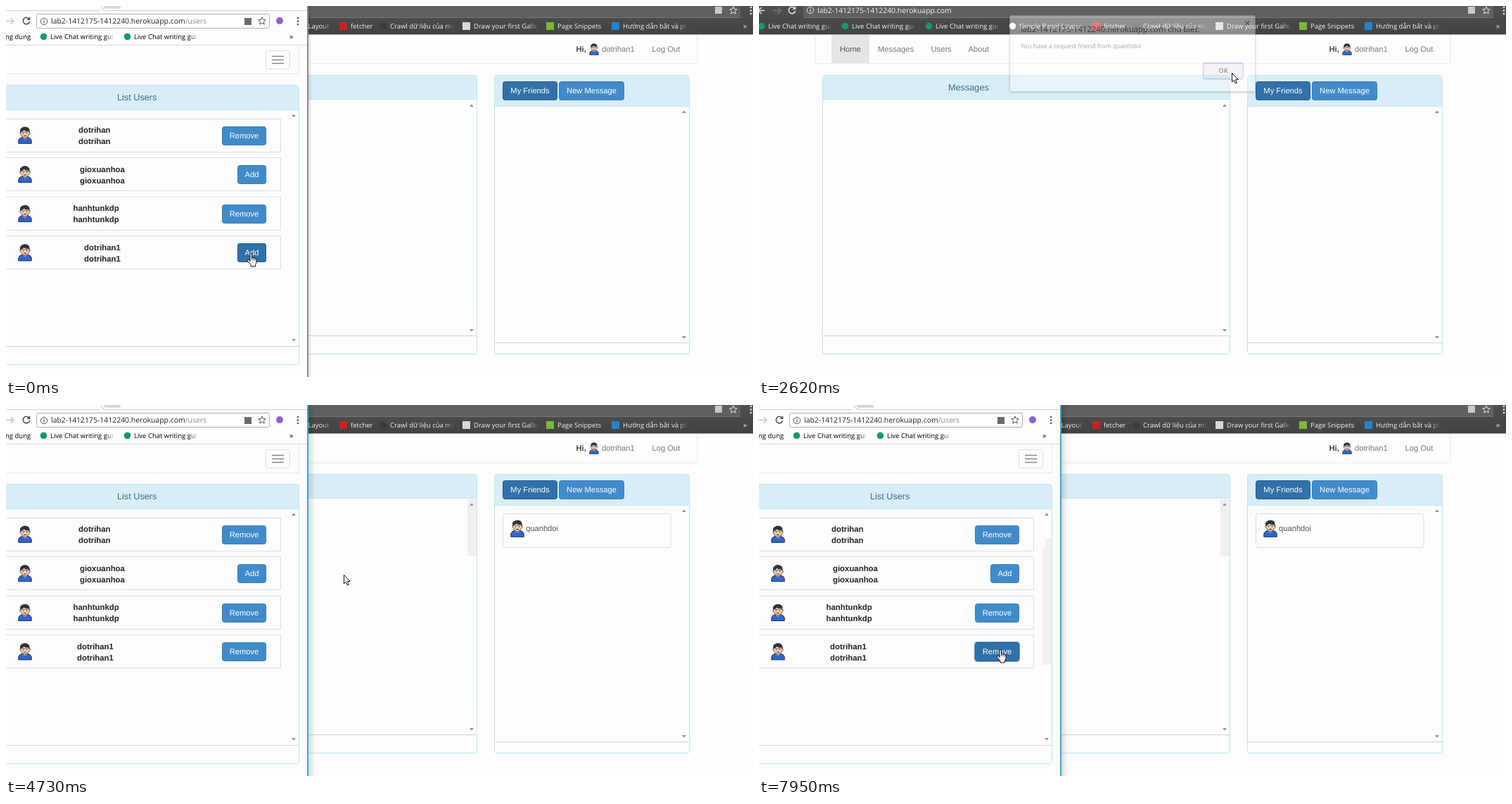
These frames come from a looping animation (1062x527 px, 8000 ms). An HTML page:

```html
<!DOCTYPE html>
<html lang="vi">
<head>
<meta charset="utf-8">
<title>Friend request</title>
<style>
html, body { margin: 0; width: 100%; height: 100%; overflow: hidden; background: #fdfdfd; }
svg { display: block; width: 1062px; height: 527px; }
text { font: 11.2px "Liberation Sans", Arial, sans-serif; text-rendering: geometricPrecision; white-space: pre; }
.ui { font: 9.5px "Open Sans", "Noto Sans", sans-serif; }
.url { font: 10.45px "Open Sans", "Noto Sans", sans-serif; }
.ask { font: 11.3px "Open Sans", "Noto Sans", sans-serif; fill: #222; }
.note { font: 8.95px "Open Sans", "Noto Sans", sans-serif; fill: #222; }
.ok { font: bold 9.2px "Open Sans", "Noto Sans", sans-serif; fill: #222; }
.title { font-size: 12.7px; fill: #3a6c86; }
.user { font-size: 11.4px; font-weight: bold; fill: #222; }
.hi { font-weight: bold; fill: #444; }
.nav { fill: #777; }
.light { fill: #f4f4f4; }
.line { fill: none; stroke: #ddd; }
.panel { fill: #fdfdfd; stroke: #bce8f1; }
.head { fill: #d9edf7; }
.tri { fill: #8f8f8f; }
.track { fill: #f0f0f0; }
.btn rect { fill: #428bca; stroke: #357ebd; }
.btn text { fill: #fff; text-anchor: middle; }
.btn.dark rect { fill: #3071a9; stroke: #285e8e; }
.ring { fill: none; stroke: #69a7df; }

.anim, .anim * { animation: 8s step-end infinite; }
#win { animation-name: win; }
#active { animation-name: active; }
#idle { animation-name: idle; }
#addRing { animation-name: addRing; }
#addRow { animation-name: addRow; }
#removeRow { animation-name: removeRow; }
#hover { animation-name: hover; }
#hoverRing { animation-name: hoverRing; }
#trackB { animation-name: trackB; }
#track1 { animation-name: track1; }
#track2 { animation-name: track2; }
#track3 { animation-name: track3; }
#friend { animation-name: friend; }
#alert { animation-name: alert; }
#press { animation-name: press; }
#cursor { animation-name: move; }
#arrow { animation-name: arrow; }
#hand { animation-name: hand; }

@keyframes win { 0%, 51% { opacity: 1 } 10.5% { opacity: 0 } 100% { opacity: 1 } }
@keyframes active { 0% { opacity: 0 } 5%, 100% { opacity: 1 } }
@keyframes idle { 0% { opacity: 1 } 5%, 100% { opacity: 0 } }
@keyframes addRing { 0% { opacity: 0 } 5% { opacity: 1 } 10.5%, 100% { opacity: 0 } }
@keyframes addRow { 0% { opacity: 1 } 10.5%, 100% { opacity: 0 } }
@keyframes removeRow { 0% { opacity: 0 } 10.5%, 100% { opacity: 1 } }
@keyframes hover { 0%, 85.625% { opacity: 0 } 65.875%, 94.375%, 100% { opacity: 1 } }
@keyframes hoverRing { 0% { opacity: 0 } 96.125%, 100% { opacity: 1 } }
@keyframes trackB { 0% { opacity: 0 } 37.625%, 100% { opacity: 1 } }
@keyframes track1 { 0% { opacity: 0 } 61%, 100% { opacity: 1 } }
@keyframes track2 { 0% { opacity: 0 } 85.625%, 100% { opacity: 1 } }
@keyframes track3 { 0% { opacity: 0 } 89.25%, 100% { opacity: 1 } }
@keyframes friend { 0% { opacity: 0 } 34.25%, 100% { opacity: 1 } }
@keyframes press { 0% { opacity: 0 } 31%, 100% { opacity: 1 } }
@keyframes alert {
  0% { opacity: 0; transform: translateY(-7px) }
  12.125% { opacity: .66; transform: translateY(-7px) }
  14% { opacity: 1; transform: none }
  32.75% { opacity: .4; transform: translateY(-6px) }
  34.25%, 100% { opacity: 0; transform: none }
}
@keyframes arrow {
  0% { opacity: 0 } 10.5% { opacity: 1 } 42.5% { opacity: 0 } 55.875% { opacity: 1 }
  65.875% { opacity: 0 } 85.625% { opacity: 1 } 94.375%, 100% { opacity: 0 }
}
@keyframes hand {
  0% { opacity: 1 } 10.5% { opacity: 0 } 65.875% { opacity: 1 }
  85.625% { opacity: 0 } 94.375%, 100% { opacity: 1 }
}
@keyframes move {
  0% { transform: translate(343px, 351px) }
  10.5% { transform: translate(310px, 354px) }
  12.125% { transform: translate(268px, 351px) }
  14% { transform: translate(269px, 350px) }
  15.875% { transform: translate(312px, 335px) }
  17.375% { transform: translate(376px, 308px) }
  19.25% { transform: translate(586px, 158px) }
  21.125% { transform: translate(640px, 106px) }
  22.625% { transform: translate(677px, 76px) }
  24.5% { transform: translate(675px, 84px) }
  26% { transform: translate(672px, 95px) }
  37.625% { transform: translate(662px, 150px) }
  39.25% { transform: translate(610px, 320px) }
  40.875% { transform: translate(526px, 496px) }
  42.5% { transform: translate(500px, 540px) }
  55.875% { transform: translate(490px, 440px) }
  57.5% { transform: translate(470px, 340px) }
  59.125% { transform: translate(480px, 241px) }
  61% { transform: translate(410px, 285px) }
  62.625% { transform: translate(294px, 320px) }
  64.125% { transform: translate(325px, 314px) }
  65.875% { transform: translate(338px, 340px) }
  67.5% { transform: translate(337px, 353px) }
  70.875% { transform: translate(336px, 352px) }
  77.5% { transform: translate(337px, 351px) }
  79.125% { transform: translate(336px, 350px) }
  85.625% { transform: translate(408px, 338px) }
  87.375% { transform: translate(514px, 190px) }
  89.25% { transform: translate(500px, 230px) }
  90.875% { transform: translate(430px, 300px) }
  92.5% { transform: translate(372px, 342px) }
  94.375% { transform: translate(338px, 349px) }
  96.125%, 100% { transform: translate(338px, 347px) }
}
</style>
</head>
<body>
<svg id="stage" viewBox="0 0 1062 527">
  <defs>
    <linearGradient id="fadeDark"><stop offset="0" stop-color="#464646" stop-opacity="0"/><stop offset=".55" stop-color="#464646"/></linearGradient>
    <linearGradient id="fadeLight"><stop offset="0" stop-color="#fdfdfd" stop-opacity="0"/><stop offset=".55" stop-color="#fdfdfd"/></linearGradient>
    <linearGradient id="shade"><stop offset="0" stop-opacity=".14"/><stop offset="1" stop-opacity=".03"/></linearGradient>
    <linearGradient id="bar" x2="0" y2="1"><stop offset="0" stop-color="#505050"/><stop offset="1" stop-color="#424242"/></linearGradient>
    <filter id="drop" x="-5%" y="-10%" width="110%" height="125%"><feDropShadow dx="0" dy="1" stdDeviation="1.3" flood-opacity=".5"/></filter>
    <symbol id="avatar" viewBox="0 0 20 25">
      <path d="M.8 24.3V20q.4-3 4.700-4.500h9q4.300 1.500 4.700 4.500v4.300z" fill="#2f66cc" stroke="#1f2f5c"/>
      <path d="M7 13h6v3.500l-3 2-3-2z" fill="#e0aa82"/>
      <path d="M4 8q-1.500 0-1.200 2 .4 1.700 1.700 1.700Q6 16.400 10 16.400t5.500-4.700q1.300 0 1.700-1.700.3-2-1.200-2z" fill="#f3cba5" stroke="#4a3a36" stroke-width=".8"/>
      <path d="M3.600 9.500Q1.800 4 5 2.300 8-.2 12 .8q5.500 1 4.500 8.700l-1.700-2.700q-4 .8-6.300-1.300-1 1.800-3.500 2z" fill="#2f333c"/>
      <path d="M7.500 9.200v1.300M12.500 9.200v1.300M8 13.500h4" stroke="#3b3030" fill="none"/>
    </symbol>
    <symbol id="info" viewBox="0 0 12 12">
      <circle cx="6" cy="6" r="4.700" fill="none" stroke="currentColor"/><path d="M6 5.200v3.500M6 3.200v1.200" stroke="currentColor" stroke-width="1.200"/>
    </symbol>
    <symbol id="star" viewBox="0 0 12 12">
      <path d="M6 1l1.500 3.400 3.700.4-2.800 2.500.8 3.700L6 9.100 2.800 11l.8-3.700L.8 4.800l3.700-.4z" fill="none" stroke="currentColor"/>
    </symbol>
    <symbol id="reload" viewBox="0 0 12 12">
      <path d="M10 3.600A4.700 4.700 0 1 0 10.600 7" fill="none" stroke="currentColor" stroke-width="1.500"/><path d="M11.300 0v5H6.500z" fill="currentColor"/>
    </symbol>
    <symbol id="dots" viewBox="0 0 4 14">
      <g fill="currentColor"><circle cx="2" cy="2" r="1.300"/><circle cx="2" cy="6.500" r="1.300"/><circle cx="2" cy="11" r="1.300"/></g>
    </symbol>
  </defs>
</svg>
<script>
const text = (x, y, s, cls = "", more = "") => `<text x="${x}" y="${y}" class="${cls}" ${more}>${s}</text>`;
const rect = (x, y, w, h, attrs) => `<rect x="${x}" y="${y}" width="${w}" height="${h}" ${attrs}/>`;
const path = (d, attrs) => `<path d="${d}" ${attrs}/>`;
const dot = (x, y, r, fill) => `<circle cx="${x}" cy="${y}" r="${r}" fill="${fill}"/>`;
const use = (id, x, y, w, h) => `<use href="#${id}" x="${x}" y="${y}" width="${w}" height="${h}"/>`;
const group = (id, body) => `<g id="${id}">${body}</g>`;
const button = (x, y, w, label, cls = "") =>
  `<g class="btn ${cls}">${rect(x + .5, y + .5, w - 1, 26, 'rx="3"')}${text(x + w / 2, y + 17.4, label)}</g>`;
const ring = (x, y, w) => rect(x - .5, y - .5, w + 1, 28, 'rx="3" class="ring"');
const arrows = (x, top, bottom) =>
  path(`M${x - 3} ${top + 2}h6l-3-3.5zM${x - 3} ${bottom - 2}h6l-3 3.5z`, 'class="tri"');

function panel(x, w, y, head, foot, end) {
  return rect(x + .5, y + .5, w, end - y, 'rx="3" class="panel"') +
    rect(x + 1, y + 1, w - 1, head - y - 1, 'rx="2" class="head"') +
    path(`M${x + 1} ${head + .5}h${w - 1}`, 'stroke="#bce8f1"') +
    path(`M${x + 1} ${foot + .5}h${w - 1}`, 'stroke="#d3d3d3"');
}

const CHAT = "Live Chat writing gui";
const HOST = "lab2-1412175-1412240.herokuapp.com";
const ME = "dotrihan1", PAL = "quanhdoi";

// label x, label, icon colour, icon shape, end of the fade (0 for none)
const marks = [
  [13, CHAT, "#159a62", "o", 104], [132, CHAT, "#159a62", "o", 223], [251, CHAT, "#159a62", "o", 342],
  [370, "Simple Panel Layout", "#f2f2f2", "o", 462], [490, "fetcher", "#cb2027", "s", 0],
  [546, "Crawl dữ liệu của một", "#3b3b3b", "o", 637], [665, "Draw your first Galle", "#d8d8d8", "s", 756],
  [784, "Page Snippets", "#78b93c", "s", 0], [877, "Hướng dẫn bắt và phâ", "#2483cf", "s", 968]
];

function bookmark([x, label, fill, shape, end], y, cls, fade) {
  const icon = shape === "o" ? dot(x - 9.5, y - 3.5, 4.8, fill) : rect(x - 16, y - 9, 11, 11, `fill="${fill}"`);
  return icon + text(x, y, label, "ui " + cls) +
    (end ? rect(end - 13, y - 10, 24, 14, `fill="url(#${fade})"`) : "");
}

function mainWindow() {
  const bar = rect(0, 0, 1062, 40.5, 'fill="url(#bar)"') +
    rect(63, -4, 981, 20, 'fill="#606060"') + path("M63 16.5h981", 'stroke="#757575"') +
    `<g color="#e8e8e8">${use("reload", 41, 0, 12, 12)}${use("info", 67, 0, 12, 12)}${use("star", 1028, 0, 12, 12)}${use("dots", 1057, 0, 4, 14)}</g>` +
    path("M8 6.5H-2M3.5 2L-1 6.5 3.5 11", 'fill="none" stroke="#e8e8e8" stroke-width="1.4"') +
    path("M20 6.5h11M26.5 2L31 6.5 26.5 11", 'fill="none" stroke="#777" stroke-width="1.4"') +
    rect(1008, 1, 10, 10, 'fill="#c9c9c9"') + text(83, 10.3, HOST, "url light") +
    marks.map(m => bookmark(m, 32, "light", "fadeDark")).join("") + text(1048, 32, "»", "url light");
  const nav = path("M79.5 41v39q0 2 2 2h899.5q2 0 2-2V41", 'fill="#fdfdfd" stroke="#e7e7e7"') +
    rect(103, 41, 54, 40, 'fill="#e5e5e5"') +
    text(115, 65, "Home", "", 'fill="#555"') + text(169, 65, "Messages", "nav") + text(244.5, 65, "Users", "nav") +
    text(297.5, 65, "About", "nav") + text(810.5, 65, "Hi,", "hi") +
    use("avatar", 829, 53, 14, 17) + text(847, 65, ME, "nav") + text(918.5, 65, "Log Out", "nav");
  const item = rect(706.5, 154.5, 238.5, 48, 'rx="3" class="line"') +
    use("avatar", 717, 163, 20, 25) + text(739, 178.5, PAL, "", 'fill="#555"');
  return bar + nav +
    panel(90, 579, 98, 132, 468, 494) + text(269, 119.7, "Messages", "title") +
    group("trackB", rect(656, 134, 13, 80, 'class="track"')) + arrows(662, 141, 461) +
    panel(694, 277, 98, 142, 478, 494) + arrows(964, 150, 471) +
    button(706, 107, 78, "My Friends", "dark") + button(786, 107, 93, "New Message") +
    group("friend", item);
}

const STEP = 55.6;
const buttonY = i => Math.round(170.6 + STEP * i);

function userRow(i, x, name, action) {
  const y = STEP * i, w = action === "Add" ? 41 : 63;
  return rect(-5, Math.round(159.5 + y) + .5, 395.5, 47, 'class="line"') +
    use("avatar", 17, 171 + y, 20, 25) +
    text(x, 180 + y, name, "user") + text(x, 196 + y, name, "user") +
    button(370 - w, buttonY(i), w, action);
}

function sideWindow() {
  const edge = (id, w, fill) => group(id,
    rect(429, 0, w, 527, 'fill="url(#shade)"') + rect(428, 0, 2, 527, `fill="${fill}"`));
  const bar = rect(0, 0, 428, 527, 'fill="#fdfdfd"') +
    path("M134 0l4 5q1 1.5 3 1.5M139 0l2 3h22l-2-3z", 'fill="#dcdcdc" stroke="#bbb" stroke-width=".7"') +
    path("M0 6.5h134M141 6.5h287", 'stroke="#d0d0d0"') +
    path("M0 21.5h11M6.5 17L11 21.5 6.5 26", 'fill="none" stroke="#c4c4c4" stroke-width="1.4"') +
    rect(43.5, 11.5, 331, 20, 'rx="2" fill="#fff" stroke="#b0b0b0"') +
    `<g color="#505050">${use("reload", 23, 15, 12, 12)}${use("info", 48, 16, 12, 12)}${use("star", 358, 15, 12, 12)}${use("dots", 413, 15, 4, 14)}</g>` +
    text(64, 25.3, HOST + '<tspan fill="#888">/users</tspan>', "url", 'fill="#222"') +
    rect(339, 17, 10, 10, 'fill="#6a6a6a"') + dot(389, 21, 5, "#8a63c9") +
    text(-1, 47, "ng dụng", "ui") +
    [[63, 155], [182, 274]].map(([x, end]) => bookmark([x, CHAT, "#159a62", "o", end], 47, "", "fadeLight")).join("") +
    text(403, 47, "»", "url") + path("M0 55.5h428", 'stroke="#d8d8d8"');
  const nav = path("M0 96.5h416.5V56", 'fill="none" stroke="#e7e7e7"') +
    rect(369.5, 63.5, 34, 26, 'rx="3" class="line"') + path("M378 71.5h17M378 76.5h17M378 81.5h17", 'stroke="#888" stroke-width="1.5"');
  const tracks = group("track1", rect(403, 240, 13, 84, 'class="track"')) +
    group("track2", rect(403, 337, 13, 32, 'class="track"')) +
    group("track3", path("M403 202h4v-12h9v179h-13z", 'class="track"'));
  const y = buttonY(3);
  const last =
    group("addRow", userRow(3, 111, ME, "Add") + button(329, y, 41, "Add", "dark") + group("addRing", ring(329, y, 41))) +
    group("removeRow", userRow(3, 101, ME, "Remove") + group("hover", button(307, y, 63, "Remove", "dark")) +
      group("hoverRing", ring(307, y, 63)));
  return bar + edge("idle", 5, "#8c8c8c") + edge("active", 9, "#3aa5d8") + nav +
    panel(-10, 426, 112, 147, 483, 509) + text(158, 134, "List Users", "title") +
    tracks + arrows(409, 155, 475) +
    userRow(0, 103, "dotrihan", "Remove") + userRow(1, 105, "gioxuanhoa", "Add") +
    userRow(2, 95.5, "hanhtunkdp", "Remove") + last;
}

const alertBox = () =>
  rect(356.5, 19.5, 349, 108, 'rx="2" fill="#fff" stroke="#b5b5b5" filter="url(#drop)"') +
  text(372, 43, HOST + " cho biết:", "ask") +
  text(372, 66, "You have a request friend from " + PAL, "note") +
  path("M691.5 27.5l5.5 5.5m0-5.5l-5.5 5.5", 'stroke="#666" stroke-width="1.6"') +
  rect(632, 87, 56, 22.5, 'rx="1" fill="#fff" stroke="#5a8fdc" stroke-width="1.3"') +
  group("press", rect(633, 88, 54, 20.5, 'fill="#e4e4e4"')) +
  text(660, 101.3, "OK", "ok", 'text-anchor="middle"');

const pointer = () =>
  group("arrow", path("M.5.5v12.5l2.9-2.7 2 4.7 2-.9-2-4.5h4z", 'fill="#fff" stroke="#111"')) +
  group("hand", path("M4 12V2q0-1.5 1.3-1.5T6.6 2v5q1-.9 2.2.2 1.2-.7 2.1.4 1.8-.5 2.1 1.4v4.5l-1.5 3v2.5H5.2v-2L.8 11.5Q0 9.8 1.2 9.3 2.4 9 4 11", 'fill="#fff" stroke="#111" stroke-linejoin="round"') +
    path("M6.6 7v3M8.8 8v2.5M10.9 8.5v2", 'stroke="#111" stroke-width=".8"'));

document.getElementById("stage").insertAdjacentHTML("beforeend",
  `<g class="anim">${mainWindow()}${group("win", sideWindow())}${group("alert", alertBox())}${group("cursor", pointer())}</g>`);
</script>
</body>
</html>
```
